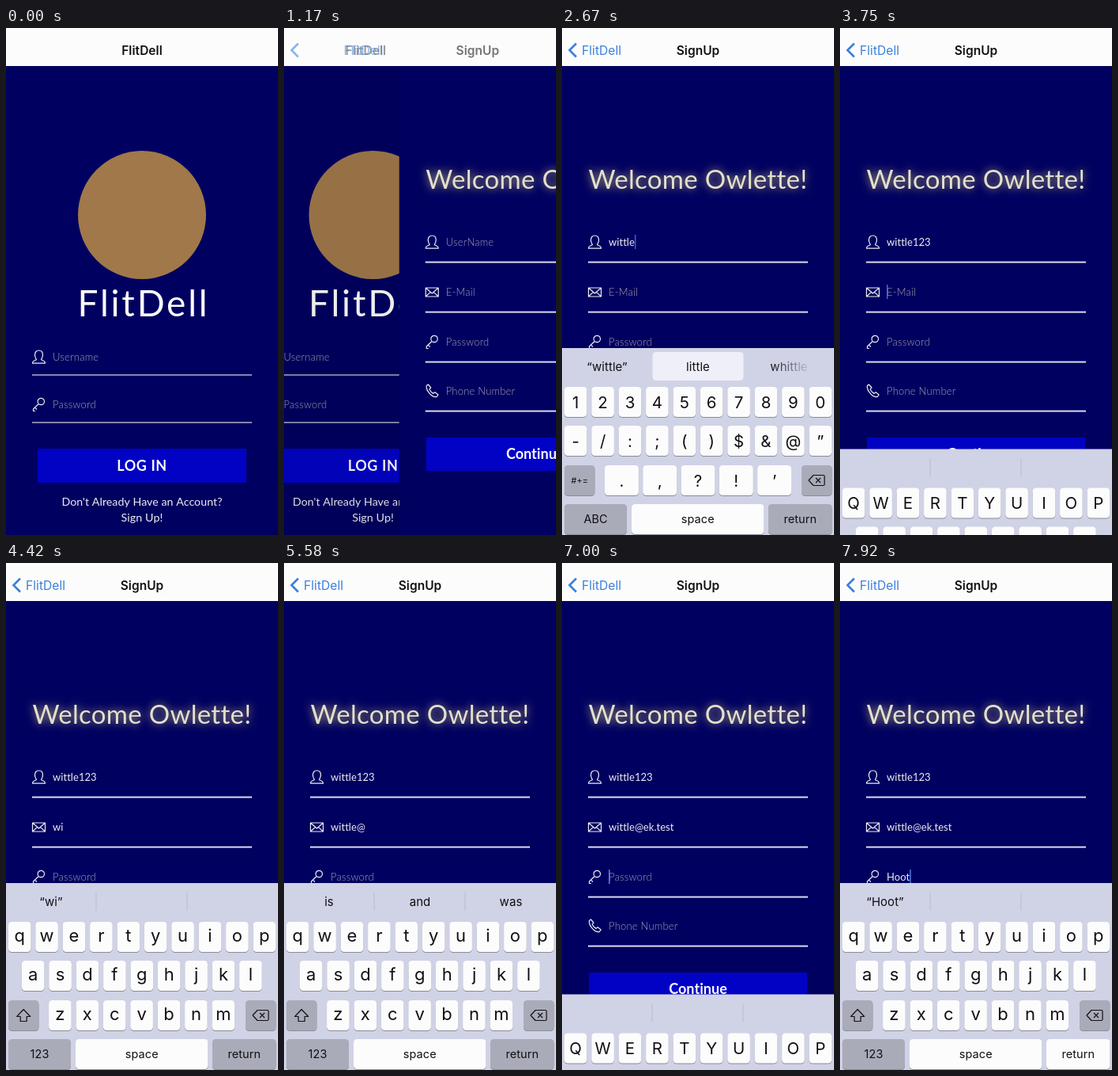
An HTML page with a canvas for the animation above (8000 ms loop, 344x640 px).

```html
<!DOCTYPE html>
<html lang="en">
<head>
<meta charset="utf-8">
<title>Sign up</title>
<style>
  html, body { margin: 0; width: 100%; height: 100%; overflow: hidden; background: #000060; }
  canvas { display: block; width: 344px; height: 640px; }
</style>
</head>
<body>
<canvas id="stage"></canvas>
<script>
const W = 344, H = 640, LOOP = 8000, APP = 'FlitDell';
const canvas = document.getElementById('stage');
const ctx = canvas.getContext('2d');
const scale = window.devicePixelRatio || 1;
canvas.width = W * scale;
canvas.height = H * scale;

const NAVY = '#000060', BLUE = '#0202c4', WHITE = '#fcfcfc', PALE = '#ececf2', LINE = '#dadaea';
const INK = '#101014', LINK = '#3a80dc', TRAY = '#d0d2e6', GRAY = '#a9abb8';
const lato = (size, weight = 400) => `${weight} ${size}px Lato, sans-serif`;
const inter = (size, weight = 400) => `${weight} ${size}px Inter, sans-serif`;

const icons = {
  user: 'M1 17.2c0-3 2-3.4 5-4.4 0-1-2-2.6-2-6C4 3 6 1 9 1s5 2 5 5.8c0 3.4-2 5-2 6 3 1 5 1.4 5 4.4z',
  mail: 'M1 4h16v11H1zM1 4l8 7 8-7M1 15l6-5.6M17 15l-6-5.6',
  key: 'M16 5.5a4.2 4.2 0 1 1-8.4 0 4.2 4.2 0 1 1 8.4 0M8.7 8.5L2 15v2.5h2.5M4 13l2.5 2.5',
  phone: 'M2 2.5l2-1.5 3.5 4-1.8 2.2c1 2 2.8 4 5 5.2l2-1.8 4 3.4-1.8 2.4C9 18 1 8.5 2 2.5z',
  shift: 'M9 1L17.5 10H13V16H5V10H.5z',
  erase: 'M7 2H19.5Q21 2 21 3.5V13.5Q21 15 19.5 15H7L1 8.5zM10 5.5l6 6M16 5.5l-6 6',
  back: 'M18 19.5L9.5 28L18 36.5'
};
for (const name in icons) icons[name] = new Path2D(icons[name]);

// Typed runs are [start, ms per letter, letters].
const fields = [
  { y: 270, label: 'UserName', icon: 'user', focus: [1360, 3080], runs: [[2000, 90, 'wittle'], [2740, 90, '123']] },
  { y: 333, label: 'E-Mail', icon: 'mail', focus: [3640, 6620],
    runs: [[4200, 125, 'wittle'], [5240, 1, '@'], [5670, 100, 'ek'], [6070, 1, '.'], [6240, 80, 'test']] },
  { y: 396, label: 'Password', icon: 'key', focus: [6890, LOOP], runs: [[7430, 130, 'Hoot']] },
  { y: 458, label: 'Phone Number', icon: 'phone', focus: [LOOP, LOOP], runs: [] }
];
const layouts = [[0, 'upper'], [1920, 'lower'], [2580, 'digits'], [3400, 'upper'], [4090, 'lower'], [5080, 'digits'],
  [5400, 'lower'], [5950, 'digits'], [6170, 'lower'], [6880, 'upper'], [7500, 'lower']];
const raises = [1360, 3654, 6917], drops = [3080, 6620], returns = [[3030, 3110], [6570, 6650], [7900, LOOP]];

const between = (t, [from, to]) => t >= from && t < to;
const typed = (field, t) => field.runs.map(([start, step, letters]) =>
  letters.slice(0, Math.max(0, Math.floor((t - start) / step) + 1))).join('');

// Critically damped spring from 0 to 1.
function spring(ms) {
  const x = Math.max(0, ms) * 0.016;
  return 1 - (1 + x) * Math.exp(-x);
}

// Any letter spacing also switches ligatures off.
function text(str, x, y, font, color, align = 'center', spacing = 0.05) {
  ctx.font = font;
  ctx.letterSpacing = spacing + 'px';
  ctx.fillStyle = color;
  ctx.textAlign = align;
  ctx.fillText(str, x, y);
}

function rect(x, y, w, h, color) {
  ctx.fillStyle = color;
  ctx.fillRect(x, y, w, h);
}

function roundRect(x, y, w, h, color) {
  ctx.fillStyle = color;
  ctx.beginPath();
  ctx.roundRect(x, y, w, h, 4.5);
  ctx.fill();
}

function icon(name, x, y, color, filled) {
  ctx.save();
  ctx.translate(x, y);
  ctx.strokeStyle = ctx.fillStyle = color;
  ctx.lineWidth = 1.2;
  ctx.lineJoin = 'round';
  if (filled) ctx.fill(icons[name]);
  ctx.stroke(icons[name]);
  ctx.restore();
}

function drawField({ y, label, icon: name }, value, lineWidth, lineY) {
  icon(name, 32.5, y - 9, PALE);
  if (value) text(value, 59, y + 4.5, lato(13), PALE, 'left');
  else text(label, 59, y + 4.5, lato(13, 300), '#a0a0b0', 'left', 0.2);
  rect(33, lineY, 278, lineWidth, LINE);
}

function drawLogin() {
  rect(0, 48, W, H, NAVY);
  ctx.fillStyle = '#a0784a';
  ctx.beginPath();
  ctx.arc(172, 236, 81, 0, 7);
  ctx.fill();
  text(APP, 174, 364, lato(46), WHITE, 'center', 2.8);
  drawField({ y: 415, label: 'Username', icon: 'user' }, '', 1.2, 437.4);
  drawField({ y: 475, label: 'Password', icon: 'key' }, '', 1.2, 497.4);
  rect(40, 531, 264, 43, BLUE);
  text('LOG IN', 172, 558.5, lato(18, 700), WHITE, 'center', 0.6);
  text("Don't Already Have an Account?", 172, 602.5, lato(14.2), PALE);
  text('Sign Up!', 172, 623, lato(14.3), PALE);
}

function drawCaret(field, value, t) {
  const phase = t % 1000;
  ctx.globalAlpha = phase < 250 || phase > 760 ? 1 : phase < 620 ? 0 : 0.8;
  ctx.font = lato(13);
  rect(59 + ctx.measureText(value).width, field.y - 9, 1.6, 18, value ? '#4c72dc' : '#7074c0');
  ctx.globalAlpha = 1;
}

function drawSignUp(t) {
  rect(0, 48, W, H, NAVY);
  ctx.save();
  ctx.shadowColor = '#c4b878';
  ctx.shadowBlur = 11 * scale;
  text('Welcome Owlette!', 172, 202.5, lato(33), '#e2dfcc', 'center', 0.3);
  ctx.restore();
  for (const field of fields) {
    const value = typed(field, t);
    drawField(field, value, 2, field.y + 24.6);
    if (between(t, field.focus)) drawCaret(field, value, t);
  }
  rect(34, 517, 276, 42, BLUE);
  text('Continue', 172, 543.5, lato(18, 700), WHITE);
}

function drawHeader(p) {
  rect(0, 0, W, 48, WHITE);
  ctx.globalAlpha = 1 - p;
  text(APP, 172 - 119 * p, 33.5, inter(15.5, 600), INK);
  ctx.globalAlpha = p;
  text('SignUp', 344 - 172 * p, 33.5, inter(15.5, 600), INK);
  text(APP, 25 + 119 * (1 - p), 33.5, inter(15.6), LINK, 'left');
  ctx.strokeStyle = LINK;
  ctx.lineWidth = 2.6;
  ctx.stroke(icons.back);
  ctx.globalAlpha = 1;
}

function key(x, y, w, label, { gray = false, size = 20.5, dy = 7.5 } = {}) {
  roundRect(x, y + 1, w, 38, '#8a8c98');
  roundRect(x, y, w, 38, gray ? GRAY : WHITE);
  text(label, x + w / 2, y + 19 + dy, inter(size), INK);
}

function keyRow(chars, firstCenter, y, style, pitch = 34.4, width = 28.6) {
  [...chars].forEach((c, i) => key(firstCenter + i * pitch - width / 2, y, width, c, style));
}

function drawSuggestions(field, t, layout) {
  const value = field ? typed(field, t) : '';
  const word = value.split(/[@.]/).pop();
  const words = word ? [`“${word}”`, '', ''] : value.includes('@') ? ['is', 'and', 'was'] : ['', '', ''];
  const corrected = word === 'wittle' && layout === 'digits' && field === fields[0];
  if (corrected) {
    words[1] = 'little';
    words[2] = 'whittle';
    roundRect(114.5, 409, 115, 36, '#eeeff8');
  } else {
    rect(113.5, 416, 1, 23, '#b8bacc');
    rect(228.5, 416, 1, 23, '#b8bacc');
  }
  words.forEach((w, i) => {
    let color = INK;
    if (corrected && i === 2) {
      const edge = 288 + (t - 2670) * 0.3;
      color = ctx.createLinearGradient(edge - 25, 0, edge + 28, 0);
      color.addColorStop(0, '#101014ff');
      color.addColorStop(1, '#10101400');
    }
    text(w, 57 + i * 115, 432.5, inter(15), color);
  });
}

function drawKeyboard(t) {
  const sum = times => times.reduce((total, start) => total + spring(t - start), 0);
  const lift = sum(raises) - sum(drops);
  if (lift < 0.002) return;
  const layout = layouts.filter(([start]) => start <= t).pop()[1];
  const digits = layout === 'digits', upper = layout === 'upper';
  const rows = digits ? ['1234567890', '-/:;()$&@”', '.,?!’']
    : ['QWERTYUIOP', 'ASDFGHJKL', 'ZXCVBNM'].map(r => upper ? r : r.toLowerCase());
  const style = upper || digits ? {} : { size: 22, dy: 5.5 };

  ctx.save();
  ctx.translate(0, 236 * (1 - lift));
  rect(0, 404, W, 240, TRAY);
  drawSuggestions(fields.find(f => between(t, f.focus)), t, layout);
  keyRow(rows[0], 17.2, 453, style);
  keyRow(rows[1], digits ? 17.2 : 34.2, 502, style);
  if (digits) keyRow(rows[2], 75.4, 552, style, 48.3, 43);
  else keyRow(rows[2], 68.4, 552, style);

  key(3, 552, 38.5, digits ? '#+=' : '', { gray: !upper, size: 11, dy: 4 });
  if (!digits) icon('shift', 13.2, 562.5, INK, upper);
  key(303, 552, 38.5, '', { gray: true });
  icon('erase', 311, 562.5, INK);

  const small = { size: 14.5, dy: 4.8 };
  key(3, 601, 79, digits ? 'ABC' : '123', { ...small, gray: true });
  key(88, 601, 167.5, 'space', small);
  key(261, 601, 80.5, 'return', { ...small, gray: !returns.some(r => between(t, r)) });
  ctx.restore();
}

function draw(t) {
  ctx.setTransform(scale, 0, 0, scale, 0, 0);
  const push = spring(t - 1050);
  if (push < 0.999) {
    ctx.save();
    ctx.translate(-0.3 * W * push, 0);
    drawLogin();
    ctx.restore();
    rect(0, 48, W, H, `rgba(0, 0, 0, ${0.1 * push})`);
  }
  if (push > 0) {
    ctx.save();
    ctx.translate(W * (1 - push), 0);
    drawSignUp(t);
    ctx.restore();
  }
  drawHeader(push);
  drawKeyboard(t);
}

function tick() {
  draw(performance.now() % LOOP);
  requestAnimationFrame(tick);
}
tick();
</script>
</body>
</html>
```
